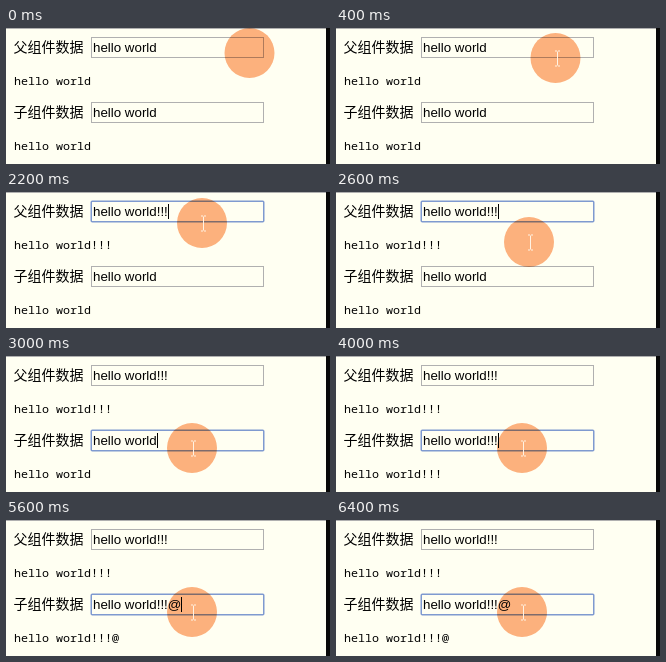
An HTML page that plays this animation: 324 by 136 pixels, repeating every 6600 ms.

```html
<!DOCTYPE html>
<html lang="zh">
<head>
<meta charset="utf-8">
<style>
  html, body { margin: 0; width: 100%; height: 100%; overflow: hidden; background: #fffff2; }
  svg { display: block; width: 324px; height: 136px; }
  text { white-space: pre; fill: #000; }
  .label { font: 14px "Noto Sans CJK SC", "Noto Sans CJK", sans-serif; }
  .value { font: 13.333px "Liberation Sans", Arial, sans-serif; }
  .echo { font: 11.667px "Noto Sans Mono", monospace; }
  .halo { mix-blend-mode: multiply; }
</style>
</head>
<body>
<svg id="stage" viewBox="0 0 324 136"></svg>
<script>
const LOOP = 6600, TICK = 200;
const stage = document.getElementById('stage');

function add(tag, attrs, parent = stage) {
  const node = document.createElementNS('http://www.w3.org/2000/svg', tag);
  for (const key in attrs) node.setAttribute(key, attrs[key]);
  parent.append(node);
  return node;
}

function addField(label, top) {
  add('text', { class: 'label', x: 7.5, y: top + 15 }).textContent = label;
  const border = add('rect', { fill: '#fffff2' });
  const value = add('text', { class: 'value', x: 87, y: top + 15 });
  const caret = add('rect', { y: top + 3, width: 1, height: 15 });
  const echo = add('text', { class: 'echo', x: 8, y: top + 48 });

  return (text, focused, caretOn) => {
    const inset = focused ? 0.25 : 0.5;
    const shape = {
      x: 85 + inset, y: top + inset, width: 173 - 2 * inset, height: 21 - 2 * inset,
      rx: focused ? 1 : 0, stroke: focused ? '#7f9ad0' : '#b0b0b0', 'stroke-width': focused ? 1.5 : 1
    };
    for (const key in shape) border.setAttribute(key, shape[key]);
    value.textContent = echo.textContent = text;
    caret.setAttribute('x', Math.round(87 + value.getComputedTextLength()));
    caret.setAttribute('visibility', focused && caretOn ? 'visible' : 'hidden');
  };
}

add('rect', { width: 320, height: 1, fill: '#b0b0b0' });
add('rect', { x: 320, width: 4, height: 136, fill: '#080808' });
const drawParent = addField('父组件数据', 9);
const drawChild = addField('子组件数据', 74);

const halo = add('circle', { class: 'halo', r: 25, fill: '#fcb184' });
const beam = add('path', {
  d: 'M-1 -7h2m1 0h2M1.5 -6.5v14M-1 8h2m1 0h2',
  fill: 'none', stroke: '#fff3e4', 'stroke-width': 1
});

// [time, x, y]
const path = [
  [0, 243.5, 25], [400, 219.5, 30], [600, 204, 31], [800, 196, 31],
  [2400, 196, 31], [2600, 193, 50], [2800, 188, 82], [3000, 186, 92], [LOOP, 186, 92]
];
const parentKeys = [[1400, '!'], [1600, '!'], [2200, '!']];
const childKeys = [[3400, '!'], [3600, '!'], [4000, '!'], [4600, '@']];
const caretOff = [[1200, 1400], [2000, 2200], [4400, 4600], [5200, 5600], [6200, LOOP]];

const typed = (keys, t) =>
  'hello world' + keys.filter(([at]) => at <= t).map(([, key]) => key).join('');

function pointerAt(t) {
  const next = path.findIndex(([at]) => at > t);
  const [t0, x0, y0] = path[next - 1], [t1, x1, y1] = path[next];
  const k = (t - t0) / (t1 - t0);
  return [x0 + (x1 - x0) * k, y0 + (y1 - y0) * k];
}

function render(t) {
  const caretOn = !caretOff.some(([from, to]) => t >= from && t < to);
  drawParent(typed(parentKeys, t), t >= 800 && t < 3000, caretOn);
  drawChild(typed(childKeys, t), t >= 3000, caretOn);
  const position = pointerAt(t);
  halo.setAttribute('transform', `translate(${position})`);
  beam.setAttribute('transform', `translate(${position.map(Math.round)})`);
  beam.setAttribute('visibility', t < 200 ? 'hidden' : 'visible');
}

function frame() {
  const t = performance.now() % LOOP;
  render(Math.floor(t / TICK) * TICK);
  requestAnimationFrame(frame);
}
frame();
</script>
</body>
</html>
```
